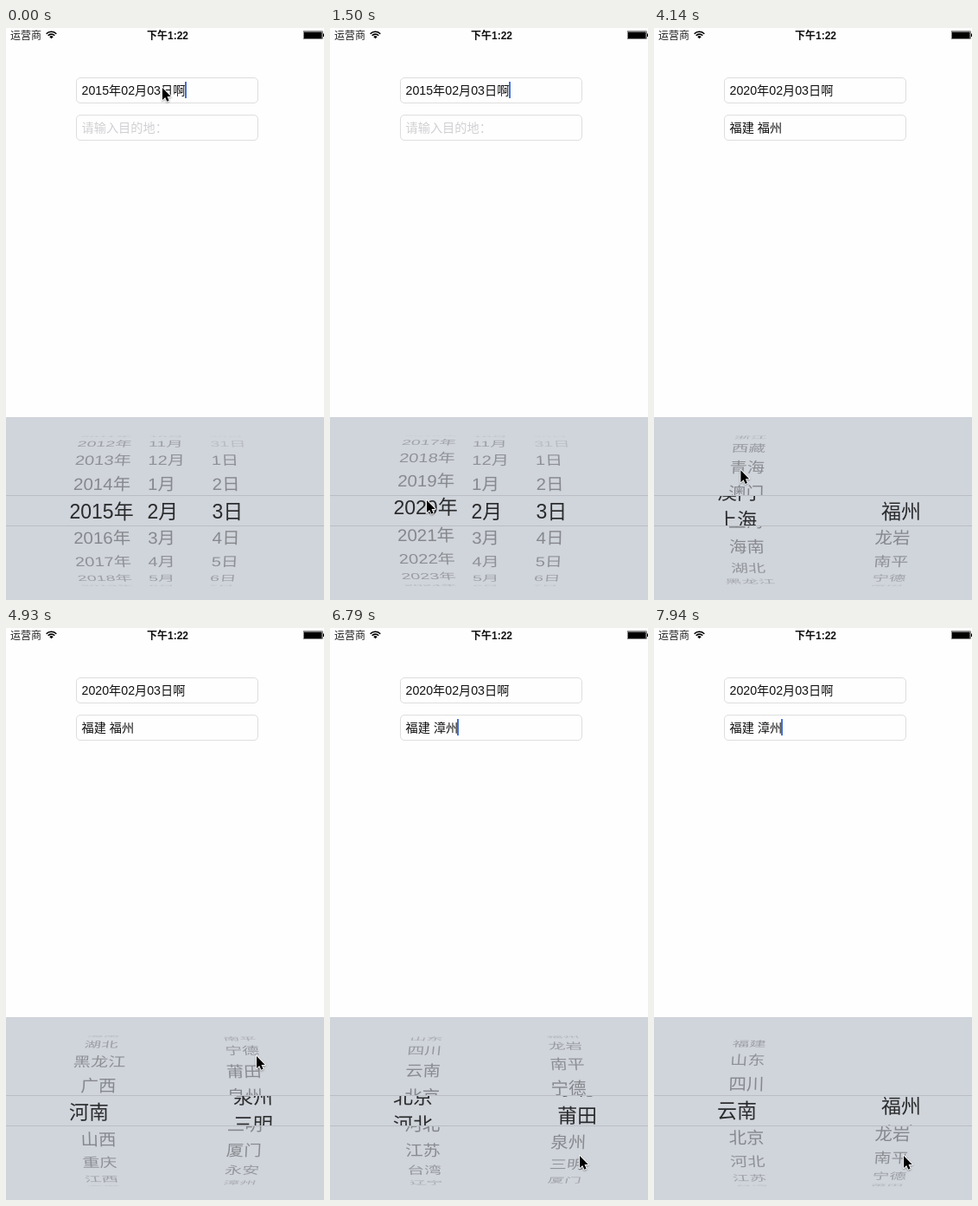
An HTML page with a canvas for the animation above (8000 ms loop, 368 by 660 pixels).

```html
<!DOCTYPE html>
<html lang="zh-CN">
<head>
<meta charset="utf-8">
<style>
html, body { margin: 0; width: 368px; height: 660px; overflow: hidden; background: #fefefe; }
canvas { display: block; width: 368px; height: 660px; }
</style>
</head>
<body>
<canvas></canvas>
<script>
const W = 368, H = 660, LOOP = 8000;
const canvas = document.querySelector('canvas');
const ctx = canvas.getContext('2d');
const dpr = window.devicePixelRatio || 1;
canvas.width = W * dpr;
canvas.height = H * dpr;

const FONT = '"Liberation Sans", "Noto Sans CJK SC", "Noto Sans CJK", sans-serif';
const PROVINCES = ('福建 山东 四川 云南 北京 河北 江苏 台湾 辽宁 吉林 内蒙古 浙江 西藏 青海 澳门 上海 海南 ' +
  '湖北 黑龙江 广西 河南 山西 重庆 江西 安徽 天津 陕西 甘肃 宁夏 新疆 广东 贵州 湖南 香港').split(' ');
const CITIES = '福州 龙岩 南平 宁德 莆田 泉州 三明 厦门 永安 漳州'.split(' ');

// Wheel geometry: a cylinder seen with a little perspective
const STEP = 21.2 * Math.PI / 180, RADIUS = 86.5, DEPTH = 0.09, MID = 557, ROW = 31.5;
const PANEL = 449, BAND = [539.5, 574.5];
const SWAP = 2820;      // date wheels give way to place wheels
const YEAR_SET = 1720;  // first field updates
const CITY_SET = 5800;  // second field updates

const mod = (n, m) => ((n % m) + m) % m;
const at = (list) => (i) => list[i] || '';

// x values are measured from the middle of the stage: outer rows, then selected row
const DATE_WHEELS = [
  { name: 'year', x: -106.5, bigX: -110.5, align: 'left', label: (i) => 2015 + i + '年' },
  { name: 'month', x: -20, bigX: -20.5, align: 'left', label: (i) => mod(i + 1, 12) + 1 + '月' },
  { name: 'day', x: 55, bigX: 54.5, align: 'left', label: (i) => mod(i + 2, 31) + 1 + '日',
    dim: (i) => mod(i + 2, 31) > 28 }
];
const PLACE_WHEELS = [
  { name: 'province', x: -77.5, bigX: -88, align: 'center', label: at(PROVINCES) },
  { name: 'city', x: 92.5, bigX: 102, align: 'center', label: at(CITIES) }
];

// The hand rests, or drags a wheel from y to endY and lets it glide to a row
const GESTURES = [
  { start: 0, end: 90, x: 181, y: 69 },
  { start: 500, end: 880, x: 112, y: 622, endY: 545, wheel: 'year', to: 5.13, tau: 60 },
  { start: 1500, end: 1500, x: 112, y: 545, wheel: 'year', to: 5, tau: 60 },
  { start: 2380, end: 3060, x: 193.5, y: 118 },
  { start: 3480, end: 3880, x: 100, y: 642, endY: 510, wheel: 'province', to: 20, tau: 245 },
  { start: 4550, end: 4840, x: 290, y: 612, endY: 494, wheel: 'city', to: 9, tau: 225 },
  { start: 5400, end: 5660, x: 108, y: 560, endY: 591.5, wheel: 'province', to: 3, tau: 500 },
  { start: 5990, end: 5990, x: 306.5, y: 568 },
  { start: 6300, end: 6603, x: 289, y: 520, endY: 609, wheel: 'city', to: 0, tau: 400 }
].map((g) => ({ endY: g.y, ...g }));

const clamp = (v) => Math.min(1, Math.max(0, v));
const mix = (a, b, k) => a + (b - a) * k;
const progress = (g, t) => (t >= g.end ? 1 : clamp((t - g.start) / (g.end - g.start)));

// Friction after a flick, coming to a full stop
const glide = (time, tau) => 1 - Math.max(0, (Math.exp(-time / tau) - 0.01) / 0.99);

function wheelPos(name, t) {
  let pos = 0;
  for (const g of GESTURES) {
    if (g.wheel !== name || t < g.start) continue;
    pos += (g.y - g.endY) / ROW * progress(g, t);
    if (t >= g.end) pos = mix(pos, g.to, glide(t - g.end, g.tau));
  }
  return pos;
}

function pointerPos(t) {
  const next = GESTURES.findIndex((g) => g.start > t);
  const last = GESTURES.at(next < 0 ? -1 : next - 1);
  const y = mix(last.y, last.endY, progress(last, t));
  if (next < 0 || t < last.end) return [last.x, y];
  const goal = GESTURES[next];
  const span = Math.min(420, goal.start - last.end);
  const k = clamp(1 - (goal.start - t) / span);
  const ease = k * k * (3 - 2 * k);
  return [mix(last.x, goal.x, ease), mix(y, goal.y, ease)];
}

function text(str, x, y, size, color, weight = 400, align = 'left') {
  ctx.font = `${weight} ${size}px ${FONT}`;
  ctx.textAlign = align;
  ctx.fillStyle = color;
  ctx.fillText(str, x, y + size * 0.37);
}

function drawWheel(w, pos, big) {
  const x0 = big ? w.bigX : w.x;
  for (let i = Math.ceil(pos - 4.2); i <= pos + 4.2; i++) {
    const angle = (i - pos) * STEP, cos = Math.cos(angle), sin = Math.sin(angle);
    if (cos <= 0.03) continue;
    const scale = 1 - DEPTH * (1 - cos);
    const fade = w.dim && w.dim(i) ? 0.45 : 1;
    ctx.save();
    ctx.transform(scale, 0, -x0 * DEPTH * sin / RADIUS, cos, W / 2 + x0 * scale, MID + RADIUS * sin);
    ctx.globalAlpha = big ? 0.8 : 0.37 * fade * Math.sqrt(cos);
    text(w.label(i), 0, 0, big ? 23 : 20.6, '#000', 300, w.align);
    ctx.restore();
  }
}

function clipped(rects, draw) {
  ctx.save();
  ctx.beginPath();
  rects.forEach(([top, bottom]) => ctx.rect(0, top, W, bottom - top));
  ctx.clip();
  draw();
  ctx.restore();
}

function picker(t) {
  ctx.fillStyle = '#d0d4db';
  ctx.fillRect(0, PANEL, W, H);
  const wheels = t < SWAP ? DATE_WHEELS : PLACE_WHEELS;
  const drawAll = (big) => wheels.forEach((w) => drawWheel(w, wheelPos(w.name, t), big));
  clipped([[PANEL, BAND[0]], [BAND[1], H]], () => drawAll(false));
  clipped([BAND], () => drawAll(true));
  ctx.fillStyle = '#babec4';
  BAND.forEach((y) => ctx.fillRect(0, Math.floor(y), W, 1));
}

function statusBar() {
  text('运营商', 5, 8.5, 12, '#222');
  text('下午1:22', 187, 8.5, 12, '#111', 700, 'center');
  ctx.strokeStyle = ctx.fillStyle = '#000';
  const fan = (r) => ctx.arc(52.5, 12.3, r, -Math.PI * 0.76, -Math.PI * 0.24);
  ctx.lineWidth = 1.6;
  for (const r of [8, 5.2]) {
    ctx.beginPath();
    fan(r);
    ctx.stroke();
  }
  ctx.beginPath();
  ctx.moveTo(52.5, 12.3);
  fan(3);
  ctx.fill();
  ctx.lineWidth = 0.5;
  ctx.strokeRect(344.3, 3.8, 22, 8.9);
  ctx.fillRect(345, 4.5, 20.6, 7.5);
  ctx.fillRect(367, 6.5, 1, 3.5);
}

function field(y, str, color, caretX) {
  ctx.strokeStyle = '#dedede';
  ctx.lineWidth = 1;
  ctx.beginPath();
  ctx.roundRect(81.5, y + 0.5, 210, 29, 4.5);
  ctx.stroke();
  text(str, 87.5, y + 14.5, 14.2, color);
  if (caretX) {
    ctx.fillStyle = '#4270d4';
    ctx.fillRect(caretX, y + 5, 2, 19);
  }
}

function fields(t) {
  const blink = (t > 270 && t < 620) || t > 2380;
  field(57, (t < YEAR_SET ? '2015' : '2020') + '年02月03日啊', '#111', blink ? 0 : 207);
  if (t < SWAP) return field(100, '请输入目的地：', '#d0d0d4');
  const caret = t < 3090 || t >= CITY_SET;
  field(100, '福建 ' + (t < CITY_SET ? '福州' : '漳州'), '#111', caret ? 147 : 0);
}

const ARROW = new Path2D('M0 0V14L3.2 11L5.3 15.7L7.6 14.7L5.5 10H9.8Z');

function pointer(t) {
  ctx.save();
  ctx.translate(...pointerPos(t));
  ctx.lineJoin = 'round';
  ctx.lineWidth = 1.8;
  ctx.strokeStyle = '#fff';
  ctx.shadowColor = 'rgba(0,0,0,.35)';
  ctx.shadowBlur = 2 * dpr;
  ctx.shadowOffsetY = dpr;
  ctx.stroke(ARROW);
  ctx.shadowColor = 'transparent';
  ctx.fillStyle = '#000';
  ctx.fill(ARROW);
  ctx.restore();
}

const begin = performance.now();

function frame() {
  const t = (performance.now() - begin) % LOOP;
  ctx.setTransform(dpr, 0, 0, dpr, 0, 0);
  ctx.fillStyle = '#fefefe';
  ctx.fillRect(0, 0, W, H);
  statusBar();
  fields(t);
  picker(t);
  pointer(t);
  requestAnimationFrame(frame);
}
frame();
</script>
</body>
</html>
```
